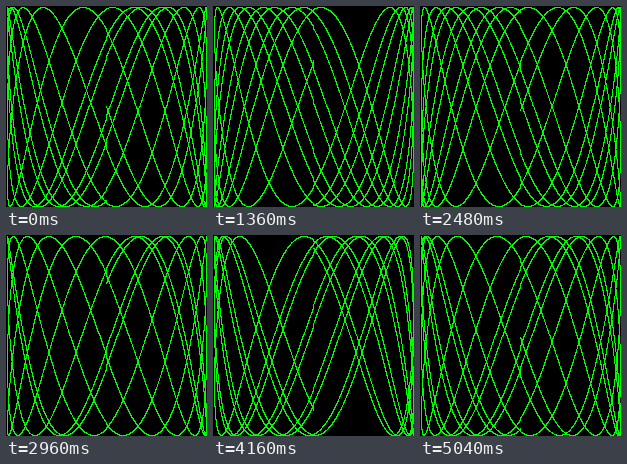
An HTML page with a canvas for the animation above (5.12 s loop, 201 px wide and 201 px high).

```html
<!DOCTYPE html>
<html lang="en">
<head>
<meta charset="utf-8">
<title>Lissajous</title>
<style>
  html, body { margin: 0; width: 100%; height: 100%; overflow: hidden; background: #000; }
  canvas { display: block; width: 201px; height: 201px; image-rendering: pixelated; }
</style>
</head>
<body>
<canvas id="stage" width="201" height="201"></canvas>
<script>
const RADIUS = 100;
const SIDE = 2 * RADIUS + 1;
const CYCLES = 5;
const STEP = 0.001;
const FREQUENCY = 2.8614;
const PHASE_STEP = 0.1;
const FRAMES = 64;
const DELAY = 80;
const BLACK = 0xff000000;
const GREEN = 0xff00ff00;

const ctx = document.getElementById('stage').getContext('2d');
const image = ctx.createImageData(SIDE, SIDE);
const pixels = new Uint32Array(image.data.buffer);

// Truncates toward zero, so row and column 0 always stay empty.
const toPixel = v => RADIUS + Math.trunc(v * RADIUS + 0.5);

function drawCurve(phase) {
  pixels.fill(BLACK);
  for (let t = 0; t < CYCLES * 2 * Math.PI; t += STEP) {
    const x = toPixel(Math.sin(t));
    const y = toPixel(Math.sin(t * FREQUENCY + phase));
    pixels[y * SIDE + x] = GREEN;
  }
  ctx.putImageData(image, 0, 0);
}

const start = performance.now();
let shown = -1;

function tick() {
  const frame = Math.floor((performance.now() - start) / DELAY) % FRAMES;
  if (frame !== shown) {
    drawCurve(frame * PHASE_STEP);
    shown = frame;
  }
  requestAnimationFrame(tick);
}
tick();
</script>
</body>
</html>
```
